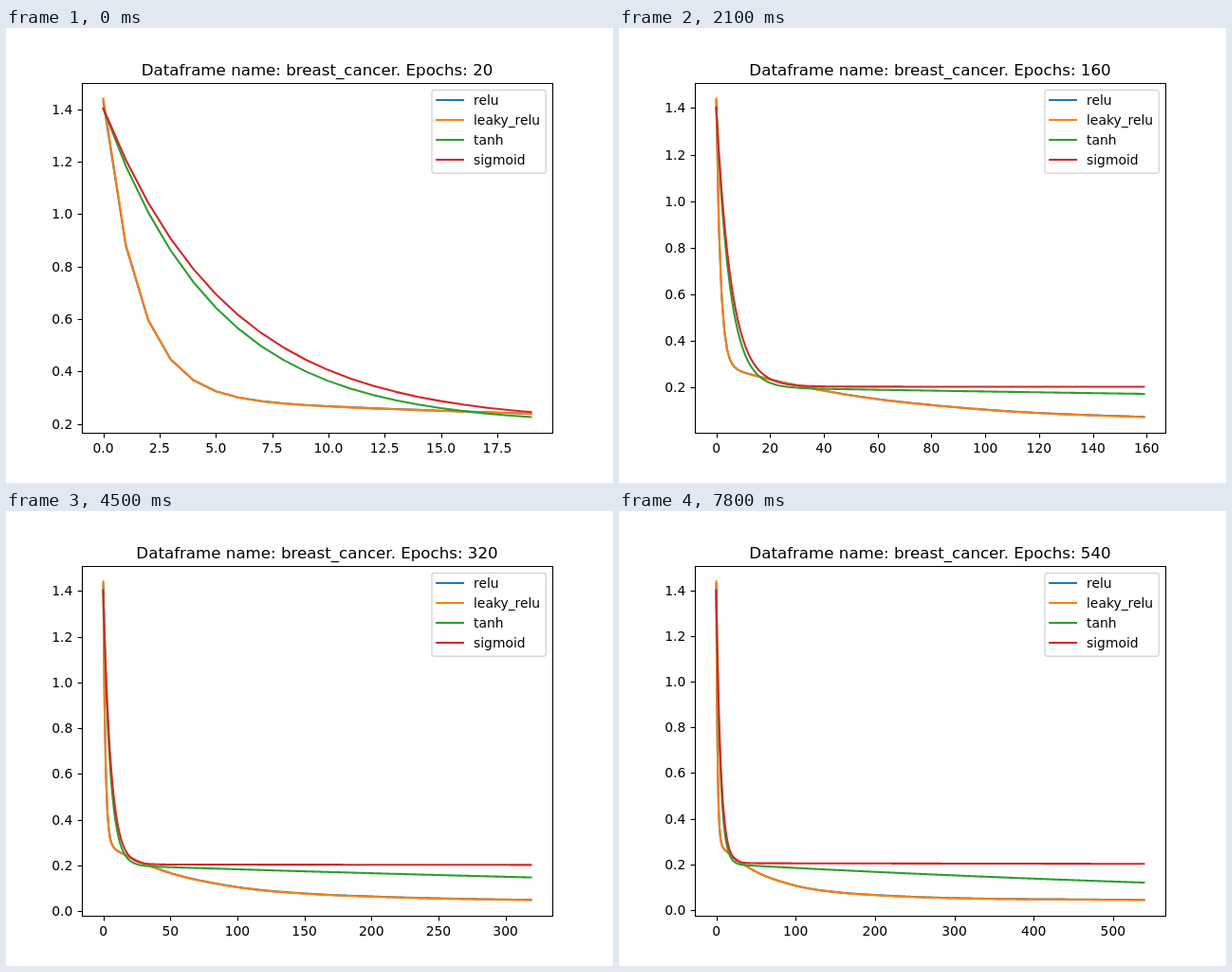
An HTML page with a canvas for the animation above (8 s loop, 640 by 480 pixels).

```html
<!DOCTYPE html>
<html lang="en">
<head>
<meta charset="utf-8">
<title>Training loss by activation</title>
<style>
  html, body { margin: 0; width: 100%; height: 100%; overflow: hidden; background: #fff; }
  canvas { display: block; }
</style>
</head>
<body>
<canvas id="plot" width="640" height="480"></canvas>
<script>
const ctx = document.getElementById('plot').getContext('2d');
const LOOP = 8000, STEP = 300, EPOCHS = 20;
const box = { l: 80, r: 576, t: 57.6, b: 427.2 };
const MARGIN = 0.05 / 1.1;

// Slow part of the relu losses: [epoch, loss], joined by a smooth curve
const knots = [
  [0, .3], [10, .2645], [20, .235], [40, .1865], [60, .15], [79, .126], [100, .105],
  [159, .074], [200, .0642], [239, .0573], [319, .0493], [459, .0445], [539, .0428]
];

function slope(i) {
  const a = knots[Math.max(i - 1, 0)], b = knots[i], c = knots[Math.min(i + 1, knots.length - 1)];
  if (a === b || b === c) return (c[1] - a[1]) / (c[0] - a[0]);
  const h = b[0] - a[0], k = c[0] - b[0];
  return ((b[1] - a[1]) / h * k + (c[1] - b[1]) / k * h) / (h + k);
}

function slow(n) {
  let i = 0;
  while (i < knots.length - 2 && n > knots[i + 1][0]) i++;
  const [x0, y0] = knots[i], [x1, y1] = knots[i + 1];
  const h = x1 - x0, u = (n - x0) / h, v = 1 - u;
  return v * v * (1 + 2 * u) * y0 + u * u * (1 + 2 * v) * y1
    + h * u * v * (v * slope(i) - u * slope(i + 1));
}

const series = [
  { name: 'relu', color: '#1f77b4', loss: n => slow(n) + .0009 + 1.13 * .516 ** n },
  { name: 'leaky_relu', color: '#ff7f0e', loss: n => slow(n) + 1.141 * .516 ** n },
  { name: 'tanh', color: '#2ca02c', loss: n => .2026 * Math.exp(-.000983 * n) + 1.1985 * .819 ** n },
  { name: 'sigmoid', color: '#d62728', loss: n => .2045 - 5.5e-6 * n + 1.199 * .8363 ** n }
];
for (const s of series) s.data = Array.from({ length: 540 }, (_, n) => s.loss(n));

// Smallest round step that gives at most nine intervals
function niceStep(range) {
  const raw = range / 9, mag = 10 ** Math.floor(Math.log10(raw));
  return [1, 2, 2.5, 5, 10].find(m => m * mag >= raw) * mag;
}

function eachTick(lo, hi, draw) {
  const step = niceStep(hi - lo), digits = step % 1 ? 1 : 0;
  for (let i = Math.ceil(lo / step); i * step <= hi; i++)
    draw(i * step, Math.abs(i * step).toFixed(digits));
}

function text(str, x, y, align, size = 13.89) {
  ctx.font = `${size}px "DejaVu Sans", sans-serif`;
  ctx.textAlign = align;
  ctx.fillStyle = '#000';
  ctx.fillText(str, x, y);
}

function line(points, color, width) {
  ctx.beginPath();
  for (const [x, y] of points) ctx.lineTo(x, y);
  ctx.strokeStyle = color;
  ctx.lineWidth = width;
  ctx.stroke();
}

const snap = v => Math.round(v) + .5;

function legend() {
  ctx.beginPath();
  ctx.roundRect(449, 65.5, 120.3, 87.8, 2.8);
  ctx.fillStyle = 'rgba(255,255,255,.8)';
  ctx.fill();
  ctx.strokeStyle = 'rgba(204,204,204,.8)';
  ctx.lineWidth = 1.39;
  ctx.stroke();
  series.forEach((s, i) => {
    const y = 76 + 21 * i;
    ctx.lineCap = 'square';
    line([[454.2, y], [482, y]], s.color, 2.083);
    text(s.name, 493, y + 5, 'left');
  });
}

function draw(count) {
  const lows = series.map(s => Math.min(...s.data.slice(0, count)));
  const yMin = Math.min(...lows), yMax = Math.max(...series.map(s => s.data[0]));
  const xPad = (count - 1) * .05, yPad = (yMax - yMin) * .05;
  const w = box.r - box.l, h = box.b - box.t;
  const px = n => box.l + w * (MARGIN + n / (count - 1) / 1.1);
  const py = v => box.t + h * (MARGIN + (yMax - v) / (yMax - yMin) / 1.1);

  ctx.fillStyle = '#fff';
  ctx.fillRect(0, 0, 640, 480);

  ctx.lineCap = 'butt';
  eachTick(-xPad, count - 1 + xPad, (v, label) => {
    const x = snap(px(v));
    line([[x, 427.5], [x, 432.4]], '#000', 1.11);
    text(label, px(v), 448, 'center');
  });
  eachTick(yMin - yPad, yMax + yPad, (v, label) => {
    const y = snap(py(v));
    line([[75.6, y], [80.5, y]], '#000', 1.11);
    text(label, 70.3, Math.round(py(v)) + 5, 'right');
  });

  ctx.lineCap = 'square';
  ctx.lineJoin = 'round';
  for (const s of series)
    line(s.data.slice(0, count).map((v, n) => [px(n), py(v)]), s.color, 2.083);

  ctx.strokeStyle = '#000';
  ctx.lineWidth = 1.11;
  ctx.strokeRect(80.5, 58.5, 496, 369);

  text(`Dataframe name: breast_cancer. Epochs: ${count}`, 328, 50, 'center', 16.67);
  legend();
}

const start = performance.now();
function tick(now) {
  const t = Math.max(0, now - start) % LOOP;
  draw(EPOCHS * (Math.floor(t / STEP) + 1));
  requestAnimationFrame(tick);
}
tick(start);
</script>
</body>
</html>
```
